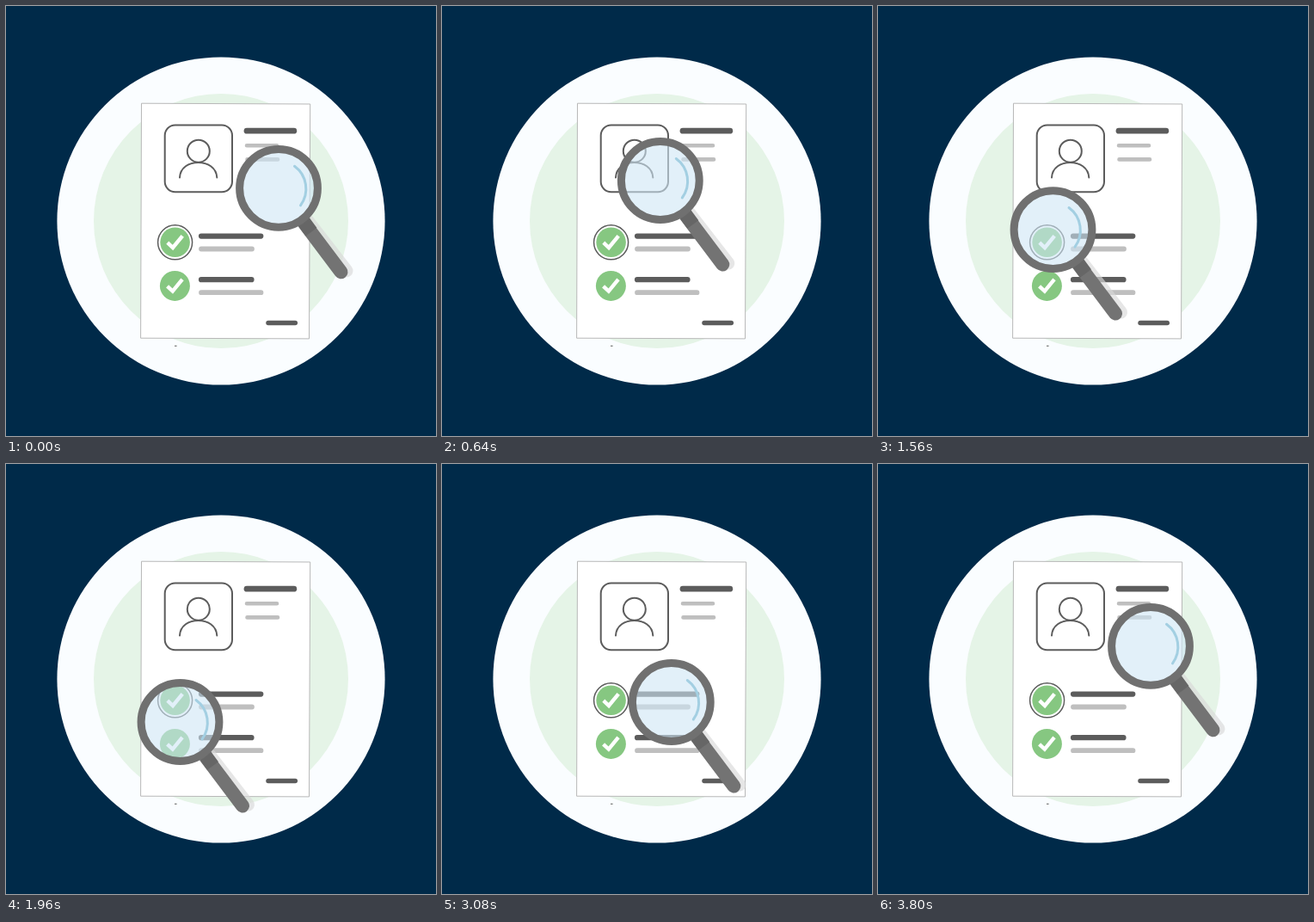
Recreate the animation shown at these times as an HTML page. Size 500 by 500 pixels, loop 4 s.

```html
<!DOCTYPE html>
<html lang="en">
<head>
<meta charset="utf-8">
<title>Document check</title>
<style>
  html, body { margin: 0; width: 100%; height: 100%; overflow: hidden; background: #002a49; }
  svg { display: block; width: 100vw; height: 100vh; }
  .line { fill: none; stroke-linecap: round; stroke-linejoin: round; }
  .dark { stroke: #5c5c5c; }
  .pale { stroke: #bfbfbf; }
  .tick { fill: none; stroke: #fff; stroke-width: 4.4; }
</style>
</head>
<body>
<svg viewBox="0 0 500 500">
  <rect width="500" height="500" fill="#002a49"/>
  <circle cx="250" cy="250" r="190.6" fill="#fafdff"/>
  <circle cx="250" cy="250" r="148" fill="#e5f4e7"/>
  <path d="M157.5 113.2L353.7 114L352.5 386.9L156.6 386.2Z" fill="#fff" stroke="#b8b8b8"/>
  <path d="M196 395.3h2.6" stroke="#777" stroke-width="1.2"/>

  <g class="line dark" stroke-width="2">
    <rect x="184.7" y="138.5" width="78.3" height="77.7" rx="12"/>
    <circle cx="223.8" cy="168.7" r="13"/>
    <path d="M202 199.5C203 176 244 176 245.3 199.5"/>
  </g>

  <g class="line dark" stroke-width="6.2">
    <path d="M280 145.2H334.8" stroke-width="6.8"/>
    <path d="M227 267.6H296.3M227 318.2H285.5"/>
    <path d="M305 368.6H336.3" stroke-width="5.5"/>
  </g>
  <g class="line pale">
    <path d="M280 162.3H315M280.5 178.4H316" stroke-width="4.6"/>
    <path d="M227 282.5H286M227 333.2H296.5" stroke-width="5.8"/>
  </g>

  <circle cx="196.6" cy="274.8" r="20" fill="#fff" stroke="#5c5c5c" stroke-width="1.5"/>
  <circle id="badge" cx="196.6" cy="274.8" r="17.3" fill="#86c781"/>
  <path class="tick" d="M187.8 275.2L194 281L205.2 267.3"/>
  <circle cx="196.4" cy="325.4" r="17.5" fill="#86c781"/>
  <path class="tick" d="M187.6 325.8L193.8 331.6L205 317.9"/>

  <g id="glass">
    <path class="line" d="M34 38L79 96" stroke="#d9d9d9" stroke-opacity=".65" stroke-width="15"/>
    <path class="line" d="M30 41L72.5 97.5" stroke="#737373" stroke-width="16"/>
    <path d="M27 36L38 51" stroke="#666" stroke-width="16"/>
    <circle r="45.5" fill="#cfe6f5" fill-opacity=".6"/>
    <path class="line" d="M18.5 -25.5A32.5 32.5 0 0 1 25.5 20" stroke="#a3cfe2" stroke-width="3"/>
    <circle r="45.4" fill="none" stroke="#707070" stroke-width="9"/>
  </g>
</svg>
<script>
  const LOOP = 4000, STEP = 40;
  const glass = document.getElementById('glass');
  const badge = document.getElementById('badge');

  // time, x, y of the lens centre
  const stops = [
    [0, 317, 211.8], [640, 253.8, 203], [1080, 215, 211.6], [1960, 202.5, 300],
    [2600, 222, 327], [3080, 266.8, 277], [3800, 317, 211.8]
  ];

  // The lens is at rest at both ends of its path
  function speed(i, axis) {
    const a = stops[i - 1], b = stops[i + 1];
    return a && b ? (b[axis] - a[axis]) / (b[0] - a[0]) : 0;
  }

  function place(t, axis) {
    const last = stops.length - 1;
    if (t >= stops[last][0]) return stops[last][axis];
    const i = stops.findIndex(s => s[0] > t) - 1;
    const a = stops[i], b = stops[i + 1];
    const span = b[0] - a[0], u = (t - a[0]) / span, v = 1 - u;
    return v * v * (1 + 2 * u) * a[axis] + u * u * (3 - 2 * u) * b[axis]
      + span * u * v * (v * speed(i, axis) - u * speed(i + 1, axis));
  }

  function draw() {
    const t = Math.floor(performance.now() % LOOP / STEP) * STEP;
    glass.setAttribute('transform', `translate(${place(t, 1)} ${place(t, 2)})`);
    badge.setAttribute('fill', t >= 2400 && t < 2760 ? '#747c76' : '#86c781');
    requestAnimationFrame(draw);
  }
  draw();
</script>
</body>
</html>
```
